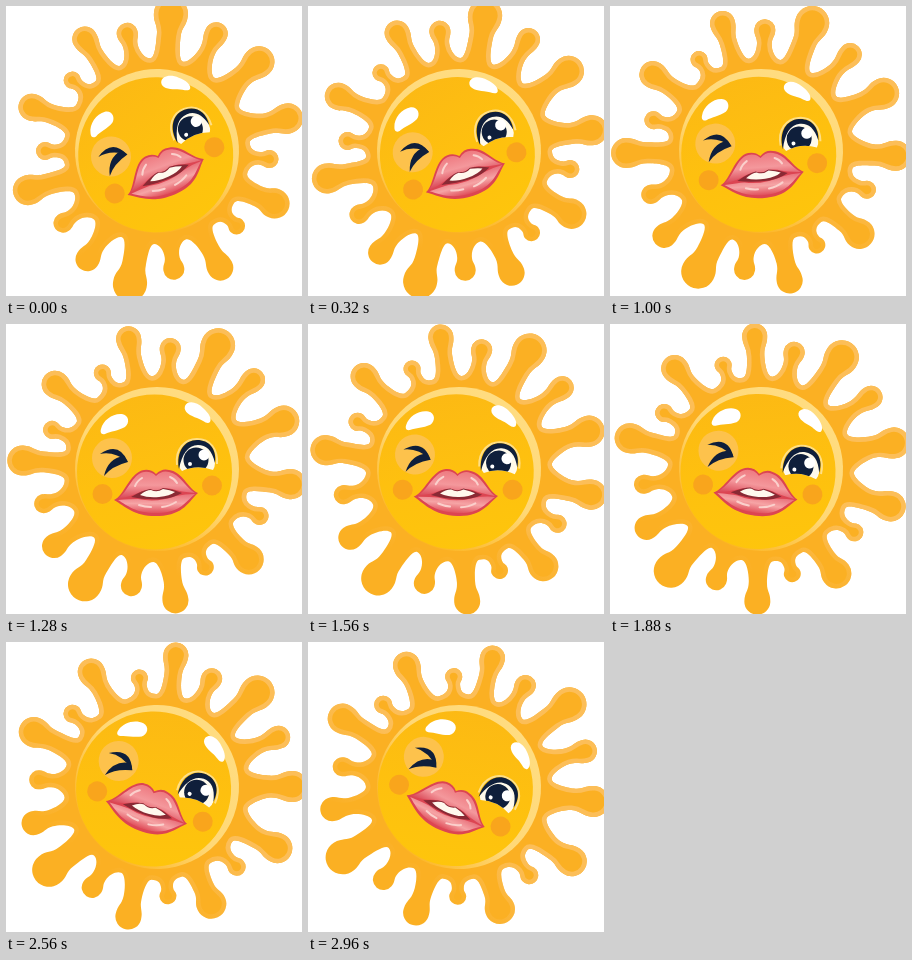
Recreate the animation shown at these times as an HTML page. Size 296x290 px, loop 3000 ms.

```html
<!DOCTYPE html>
<html lang="en">
<head>
<meta charset="utf-8">
<title>Kissing sun</title>
<style>
  html, body { margin: 0; width: 100%; height: 100%; overflow: hidden; background: #fff; }
  svg { display: block; width: 100vw; height: 100vh; }
</style>
</head>
<body>
<svg viewBox="0 0 296 290">
  <defs>
    <linearGradient id="rim" gradientUnits="userSpaceOnUse" x1="35" y1="-130" x2="-25" y2="95">
      <stop offset=".6" stop-color="#fcbe58"/>
      <stop offset="1" stop-color="#fcbe58" stop-opacity="0"/>
    </linearGradient>
    <linearGradient id="disc" x1=".3" y1="0" x2=".6" y2="1">
      <stop offset="0" stop-color="#fcb914"/>
      <stop offset=".5" stop-color="#fec00f"/>
      <stop offset="1" stop-color="#fec50c"/>
    </linearGradient>
    <linearGradient id="shine" x1=".75" y1=".1" x2=".3" y2=".95">
      <stop offset="0" stop-color="#ffdc80"/>
      <stop offset=".5" stop-color="#ffd876"/>
      <stop offset="1" stop-color="#fcb522"/>
    </linearGradient>
    <linearGradient id="upperLip" x1="0" y1="0" x2="0" y2="1">
      <stop offset="0" stop-color="#ee7a80"/>
      <stop offset=".5" stop-color="#f4989c"/>
      <stop offset="1" stop-color="#d84453"/>
    </linearGradient>
    <linearGradient id="lowerLip" x1="0" y1="0" x2="0" y2="1">
      <stop offset="0" stop-color="#e8707a"/>
      <stop offset=".5" stop-color="#f6a4a5"/>
      <stop offset="1" stop-color="#e0505c"/>
    </linearGradient>
    <clipPath id="bodyShape"><path id="bodyClip"/></clipPath>
    <clipPath id="eyeShape">
      <path d="M22-4C22-19 29-28 40-28C51-28 58-20 58-6Q58-2 56 1Q40-5 25 2Q22-1 22-4Z"/>
    </clipPath>
  </defs>

  <g id="sun">
    <path id="body" fill="#fbb023"/>
    <path id="edge" fill="none" stroke="url(#rim)" stroke-width="9" clip-path="url(#bodyShape)"/>

    <circle r="82" fill="url(#shine)"/>
    <circle cx="-2.5" cy="3" r="77.5" fill="url(#disc)"/>

    <g fill="#fff">
      <path d="M-56-40C-54-49-44-56-35-55C-28-54-27-46-32-42C-39-38-46-38-52-35C-56-34-57-37-56-40Z"/>
      <path d="M28-63C31-69 40-67 46-61C52-56 55-50 53-47C50-44 46-49 40-51C34-53 26-57 28-63Z"/>
    </g>

    <circle cx="-45" cy="-11" r="20" fill="#fdc24c"/>
    <g fill="#0f1f3b">
      <path d="M-57-15Q-38-28-29-7Q-43-18-57-15Z"/>
      <path d="M-29-7L-33-13Q-49-11-53 7Q-45-3-29-7Z"/>
    </g>

    <path d="M20-4C18-20 28-30 40-30C53-30 61-20 60-5" fill="none" stroke="#ffdf86" stroke-width="2"/>
    <g clip-path="url(#eyeShape)">
      <rect x="20" y="-32" width="44" height="38" fill="#fffaea"/>
      <circle cx="39" cy="-9" r="12.5" fill="#0f1f3b"/>
      <circle cx="47" cy="-14" r="5.5" fill="#fff"/>
      <circle cx="33" cy="-5" r="2" fill="#fff"/>
    </g>
    <path d="M22 0C19-18 28-29 40-29C52-29 60-20 58-6C55-19 49-24 41-24C31-24 25-15 22 0Z" fill="#0f1f3b"/>

    <g fill="#f9a51c">
      <circle cx="-54.5" cy="25" r="10"/>
      <circle cx="55" cy="16.5" r="10"/>
    </g>

    <path d="M-43 31C-33 27-27 3-13 1Q-6 0-1 5Q5-1 12 1C26 3 30 19 41 24C32 32 27 46 2 47C-22 48-31 38-43 31Z" fill="#dc4552"/>
    <path d="M-40 30C-30 25-25 5-13 3Q-6 2-1 7Q5 1 12 3C23 5 28 18 38 24Q24 23 15 20Q6 18 0 22Q-8 19-17 23Q-27 28-40 30Z" fill="url(#upperLip)"/>
    <path d="M-39 31Q-26 30-19 30Q0 34 19 27Q28 25 38 25C28 33 24 43 2 44C-20 45-29 37-39 31Z" fill="url(#lowerLip)"/>
    <path d="M-26 28Q-14 21-7 20Q0 23 6 19Q16 20 25 24Q16 29 6 30Q-12 31-26 28Z" fill="#8a2934"/>
    <path d="M-17 26Q-11 21-6 21Q0 24 6 20Q13 21 18 23Q13 27 2 28Q-9 29-17 26Z" fill="#fff8ed"/>
    <path d="M-18 36Q-12 38-6 38M5 38Q13 37 19 33M-15 9Q-20 12-22 17M13 8Q18 10 20 14"
          fill="none" stroke="#fbd0cc" stroke-width="2" stroke-linecap="round"/>
  </g>
</svg>

<script>
const LOOP = 3000, STEP = 40, SPEED = 16 / 1000, START = -20.5;
const CENTER = [151, 145], VALLEY = 93;

// Each ray: clockwise angle from the top, tip radius, drop radius.
const rays = [
  [-12.3, 146, 12.5], [6.3, 132, 10.5], [26.3, 155, 17], [47.3, 143, 11.5],
  [69.3, 151, 15.5], [96.5, 150, 15], [114.6, 122, 9],
  [134.6, 144, 15], [153.8, 118, 8.5], [172, 146, 13], [192.4, 130, 10.5],
  [212, 153, 17], [233.2, 141, 12], [253, 128, 9.5], [273.6, 150, 15],
  [290.5, 121, 9], [309.8, 146, 13.5], [330.4, 119, 8.5]
];

// Maps distance along a ray and sideways offset to stage coordinates.
function local(angle) {
  const a = angle * Math.PI / 180, s = Math.sin(a), c = Math.cos(a);
  return (along, side) =>
    `${(along * s + side * c).toFixed(2)} ${(side * s - along * c).toFixed(2)} `;
}

function bodyPath() {
  const count = rays.length;
  const valleys = rays.map(([angle], i) => {
    const next = rays[(i + 1) % count][0] + (i === count - 1 ? 360 : 0);
    return local((angle + next) / 2);
  });
  let d = 'M' + valleys[count - 1](VALLEY, 0);
  rays.forEach(([angle, tip, b], i) => {
    const p = local(angle), mid = tip - b;
    const neck = VALLEY + (mid - VALLEY) * 0.5, n = b * 0.7;
    const bend = (mid - neck) * 0.5;
    const before = valleys[(i + count - 1) % count], after = valleys[i];
    d += `C${before(VALLEY, 5)}${p(neck - 7, -n)}${p(neck, -n)}` +
      `C${p(neck + bend, -n)}${p(mid - bend, -b)}${p(mid, -b)}` +
      `A${b} ${b} 0 0 1 ${p(mid, b)}` +
      `C${p(mid - bend, b)}${p(neck + bend, n)}${p(neck, n)}` +
      `C${p(neck - 7, n)}${after(VALLEY, -5)}${after(VALLEY, 0)}`;
  });
  return d + 'Z';
}

const outline = bodyPath();
for (const id of ['body', 'edge', 'bodyClip']) {
  document.getElementById(id).setAttribute('d', outline);
}

const sun = document.getElementById('sun');

function draw(now) {
  const time = Math.floor((now % LOOP) / STEP) * STEP;
  sun.setAttribute('transform',
    `translate(${CENTER}) rotate(${START + time * SPEED})`);
}

const origin = performance.now();
function tick() {
  draw(performance.now() - origin);
  requestAnimationFrame(tick);
}
tick();
</script>
</body>
</html>
```
